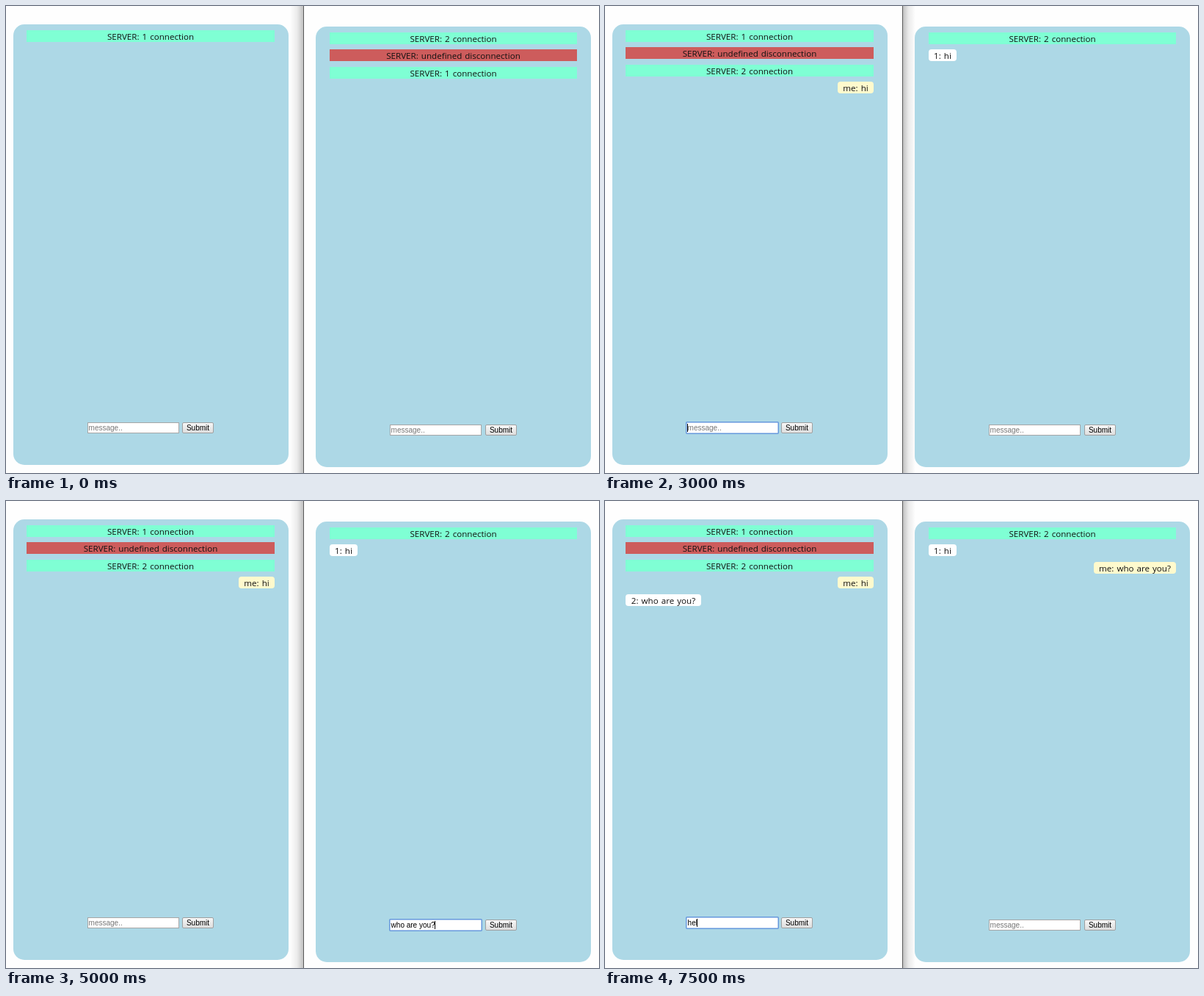
An HTML page for the animation above (8000 ms loop, 808 by 636 pixels).

```html
<!DOCTYPE html>
<html lang="en">
<head>
<meta charset="utf-8">
<title>Two chat windows</title>
<style>
  html, body { margin: 0; width: 100%; height: 100%; overflow: hidden; background: #fefefe; }
  svg { display: block; }
  .chat { font: 11.6px "Open Sans", "Noto Sans", sans-serif; word-spacing: 1px; }
  .ui { font: 10px "Liberation Sans", Arial, sans-serif; }
</style>
</head>
<body>
<svg id="stage" width="808" height="636" viewBox="0 0 808 636">
  <defs>
    <linearGradient id="toLeft" x1="1" x2="0">
      <stop offset="0" stop-color="#000" stop-opacity=".24"/>
      <stop offset=".45" stop-color="#000" stop-opacity=".08"/>
      <stop offset="1" stop-color="#000" stop-opacity="0"/>
    </linearGradient>
    <linearGradient id="toRight">
      <stop offset="0" stop-color="#000" stop-opacity=".24"/>
      <stop offset=".45" stop-color="#000" stop-opacity=".08"/>
      <stop offset="1" stop-color="#000" stop-opacity="0"/>
    </linearGradient>
    <linearGradient id="face" x2="0" y2="1">
      <stop offset="0" stop-color="#f8f8f8"/>
      <stop offset="1" stop-color="#dddddd"/>
    </linearGradient>
  </defs>
</svg>
<script>
const LOOP = 8000;
const stage = document.getElementById('stage');

function add(parent, tag, attrs, text) {
  const node = document.createElementNS('http://www.w3.org/2000/svg', tag);
  for (const key in attrs) node.setAttribute(key, attrs[key]);
  if (text) node.textContent = text;
  parent.appendChild(node);
  return node;
}
const rect = (parent, x, y, width, height, fill, more) =>
  add(parent, 'rect', { x, y, width, height, fill, ...more });
const show = (node, on) => node.setAttribute('visibility', on ? 'visible' : 'hidden');

const FILL = { join: '#7fffd4', leave: '#cd5c5c', me: '#fffacd', them: '#ffffff' };

// Each row: line, kind, text, start, end, bubble width
const row = (line, kind, text, from, to = LOOP, width = 0) =>
  ({ line, kind, text, from, to, width });

// Each draft: time it appears, field text
const panes = [
  {
    dx: 0, dy: 0,
    rows: [
      row(0, 'join', 'SERVER: 1 connection', 0),
      row(1, 'leave', 'SERVER: undefined disconnection', 500),
      row(2, 'join', 'SERVER: 2 connection', 500),
      row(3, 'me', 'me: hi', 3000, LOOP, 49),
      row(4, 'them', '2: who are you?', 5500, LOOP, 103)
    ],
    focus: [[1500, 3500], [7000, LOOP]],
    drafts: [[0, ''], [2000, 'h'], [2500, 'hi'], [3000, ''], [7500, 'hel']]
  },
  {
    dx: 412.3, dy: 3,
    rows: [
      row(0, 'join', 'SERVER: 2 connection', 0),
      row(1, 'leave', 'SERVER: undefined disconnection', 0, 500),
      row(2, 'join', 'SERVER: 1 connection', 0, 500),
      row(1, 'them', '1: hi', 3000, LOOP, 38),
      row(2, 'me', 'me: who are you?', 5500, LOOP, 112)
    ],
    focus: [[3500, 7000]],
    drafts: [[0, ''], [4000, 'wh'], [4500, 'who are'], [5000, 'who are you?'], [5500, '']]
  }
];

function buildRow(pane, item) {
  const g = add(stage, 'g', { class: 'chat' });
  const left = Math.round(28.3 + pane.dx), right = Math.round(366 + pane.dx);
  const y = 33 + pane.dy + Math.floor(item.line * 23.5);
  const bubble = item.width > 0;
  const width = bubble ? item.width : right - left;
  const x = item.kind === 'me' ? right - width : left;
  rect(g, x, y, width, 16, FILL[item.kind], { rx: bubble ? 4 : 0 });
  add(g, 'text', { x: x + width / 2, y: y + 12.7, 'text-anchor': 'middle', fill: '#111' }, item.text);
  item.node = g;
}

function buildPane(pane) {
  const at = x => Math.round(x + pane.dx), dy = pane.dy;
  rect(stage, at(10), 25 + dy, 375, 600, '#add8e6', { rx: 15 });
  pane.rows.forEach(item => buildRow(pane, item));

  const g = add(stage, 'g', { class: 'ui' });
  const fx = at(111), bx = at(240.3), y = 567 + dy;
  rect(g, fx + .5, y + .5, 124, 14, '#fff', { stroke: '#a6a6a6' });
  pane.ring = rect(g, fx - .25, y - .25, 125.5, 15.5, '#fff', { stroke: '#6598dc', 'stroke-width': 1.5, rx: 1 });
  pane.text = add(g, 'text', { x: fx + 1.6, y: y + 11 });
  pane.caret = rect(g, 0, y + 2, 1, 11, '#000');
  pane.textX = fx + 1.6;
  rect(g, bx + .5, y + .5, at(283.4) - bx - 1, 14, 'url(#face)', { stroke: '#a0a0a0', rx: 1.5 });
  add(g, 'text', { x: (bx + at(283.4)) / 2, y: y + 11, 'text-anchor': 'middle', fill: '#000' }, 'Submit');
}

const shadeLeft = rect(stage, 387, 0, 18, 636, 'url(#toLeft)');
const shadeRight = rect(stage, 406, 0, 17, 636, 'url(#toRight)');
panes.forEach(buildPane);
rect(stage, 405, 0, 1, 636, '#585858');

function drawPane(pane, t) {
  for (const item of pane.rows) show(item.node, t >= item.from && t < item.to);
  const focused = pane.focus.some(([from, to]) => t >= from && t < to);
  const draft = pane.drafts.filter(d => d[0] <= t).pop()[1];
  pane.text.textContent = draft || 'message..';
  pane.text.setAttribute('fill', draft ? '#000' : '#777');
  const end = draft ? pane.text.getComputedTextLength() : 0;
  pane.caret.setAttribute('x', Math.floor(pane.textX + end));
  show(pane.ring, focused);
  show(pane.caret, focused);
  return focused;
}

function draw(t) {
  const leftActive = drawPane(panes[0], t);
  drawPane(panes[1], t);
  show(shadeLeft, !leftActive);
  show(shadeRight, leftActive);
}

let start;
function tick(now) {
  if (start === undefined) start = now;
  draw((now - start) % LOOP);
  requestAnimationFrame(tick);
}
draw(0);
requestAnimationFrame(tick);
</script>
</body>
</html>
```
